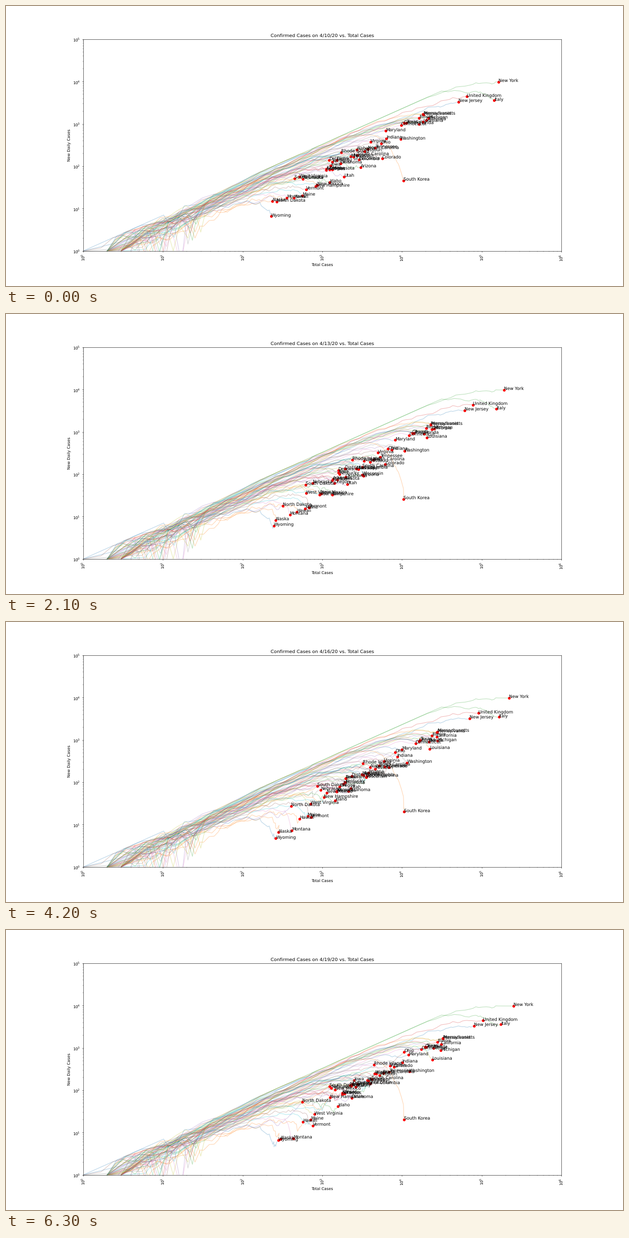
Animation, 1110 px wide and 505 px high, one loop 7000 ms. Source, as a matplotlib script:

```python
import numpy as np
import matplotlib.pyplot as plt
from matplotlib.animation import FuncAnimation

W, H, DPI = 1110, 505, 50
LEFT, RIGHT, TOP, BOTTOM = 0.125, 0.9, 0.8815, 0.125
X_DECADE = W * (RIGHT - LEFT) / 6
Y_DECADE = H * (TOP - BOTTOM) / 5
DAYS = 10

# Where each dot starts on the stage.
STARTS = {
    "Alabama": (631, 259), "Alaska": (479, 352), "Arizona": (638, 291),
    "Arkansas": (576, 296), "California": (756, 206), "Colorado": (677, 275),
    "Connecticut": (711, 215), "Delaware": (581, 278),
    "District of Columbia": (595, 278), "Florida": (743, 213),
    "Georgia": (716, 211), "Hawaii": (518, 346), "Idaho": (582, 318),
    "Illinois": (743, 202), "Indiana": (684, 239), "Iowa": (584, 288),
    "Kansas": (576, 294), "Kentucky": (587, 281), "Louisiana": (750, 209),
    "Maine": (533, 342), "Maryland": (683, 225), "Massachusetts": (751, 196),
    "Michigan": (760, 202), "Minnesota": (587, 295), "Mississippi": (620, 271),
    "Missouri": (645, 262), "Montana": (505, 346), "Nebraska": (534, 312),
    "Nevada": (625, 272), "New Hampshire": (557, 325),
    "New Jersey": (814, 173), "New Mexico": (560, 323),
    "New York": (886, 137), "North Carolina": (651, 258),
    "North Dakota": (487, 353), "Ohio": (675, 248), "Oklahoma": (602, 284),
    "Oregon": (582, 295), "Pennsylvania": (750, 195),
    "Rhode Island": (603, 264), "South Carolina": (632, 269),
    "South Dakota": (519, 311), "Tennessee": (664, 256), "Texas": (720, 211),
    "Utah": (608, 308), "Vermont": (540, 331), "Virginia": (656, 245),
    "Washington": (710, 240), "West Virginia": (528, 308),
    "Wisconsin": (635, 277), "Wyoming": (477, 379), "South Korea": (715, 315),
    "Italy": (878, 170), "United Kingdom": (829, 163),
}
# Total fall (or rise, if negative) of the dots that do not stay level.
DRIFT = {
    "Alaska": 25, "Arizona": -32, "Colorado": -28, "Iowa": -17,
    "Louisiana": 25, "Michigan": 15, "Minnesota": -15, "Montana": 30,
    "Nebraska": -27, "New Hampshire": -23, "New Mexico": -35,
    "North Dakota": -43, "Ohio": -28, "Oklahoma": 19, "Rhode Island": -21,
    "South Dakota": -29, "Utah": -25, "Vermont": 22, "Washington": 15,
    "West Virginia": 24, "South Korea": 27,
}

rng = np.random.default_rng(20)


def recent(x, y, drift):
    """Log totals and log daily cases; daily cases are a three-day mean."""
    t = np.arange(DAYS) / (DAYS - 1)
    log_new = (H * (1 - BOTTOM) - y - drift * t) / Y_DECADE
    # Small counts sag in midweek and waver more.
    small = max(0, 1 - log_new[0] / 4)
    log_new -= small * np.sin(np.pi * t) * (0.2 + rng.normal(0, 0.08, DAYS))
    new = 10 ** log_new
    total = [10 ** ((x - W * LEFT) / X_DECADE)]
    for d in range(1, DAYS):
        total.append(total[-1] + new[d] if d < 3 else total[d - 3] + 3 * new[d])
    return np.log10(total), log_new


def history(end_x, end_y):
    """Nearly straight log growth that bends down towards its end."""
    free = -0.96 + 0.105 * end_x + rng.normal(0, 0.08)
    depth = free - (end_y - end_x)
    power = 4 + 4 * depth ** 2
    x = np.log10(rng.choice([1, 2, 2, 3, 3]))
    xs, ys = [x], [0]
    x += rng.uniform(0.1, 0.5)
    noise = rng.normal(0, 0.1)
    while x < end_x - 0.02:
        share = free - depth * (x / end_x) ** power
        noise = 0.6 * noise + rng.normal(0, 0.015 + 0.13 * np.exp(-x / 1.1))
        y = x + share + noise + 0.5 * np.exp(-x)
        if 0.5 < x < 1.5 and rng.random() < 0.05:
            y -= rng.uniform(0.3, 1)
        xs.append(x)
        ys.append(min(y, 0.84 * x))
        x += max(np.log10(1 + 10 ** share) * rng.uniform(0.6, 1.4), 0.012)
    return xs, ys


plt.rcParams.update({"font.family": "DejaVu Sans", "font.size": 10.1,
                     "text.hinting": "none"})
fig = plt.figure(figsize=(W / DPI, H / DPI), dpi=DPI, facecolor="white")
fig.subplots_adjust(left=LEFT, right=RIGHT, top=TOP, bottom=BOTTOM)
ax = fig.add_subplot()
ax.set(xscale="log", yscale="log", xlim=(1, 1e6), ylim=(1, 1e5),
       xlabel="Total Cases", ylabel="New Daily Cases")
ax.tick_params(axis="x", labelrotation=90)
title = ax.set_title("", fontsize=12.2)

tracks = []
for i, (name, start) in enumerate(STARTS.items()):
    day_x, day_y = recent(*start, DRIFT.get(name, 0))
    past_x, past_y = history(day_x[0], day_y[0])
    xs = 10 ** np.append(past_x, day_x)
    ys = 10 ** np.append(past_y, day_y)
    trail, = ax.plot([], [], color=f"C{i % 10}", lw=1.5, alpha=0.3)
    dot, = ax.plot([], [], "ro", ms=6)
    label = ax.text(1, 1, name, fontsize=11.1)
    tracks.append((xs, ys, trail, dot, label))


def draw(day):
    title.set_text(f"Confirmed Cases on 4/{10 + day}/20 vs. Total Cases")
    for xs, ys, trail, dot, label in tracks:
        n = len(xs) - DAYS + day + 1
        trail.set_data(xs[:n], ys[:n])
        dot.set_data(xs[n - 1:n], ys[n - 1:n])
        label.set_position((xs[n - 1], ys[n - 1]))
    return []


anim = FuncAnimation(fig, draw, frames=DAYS, interval=700,
                     repeat=True, repeat_delay=0, blit=False)
plt.show()
```
